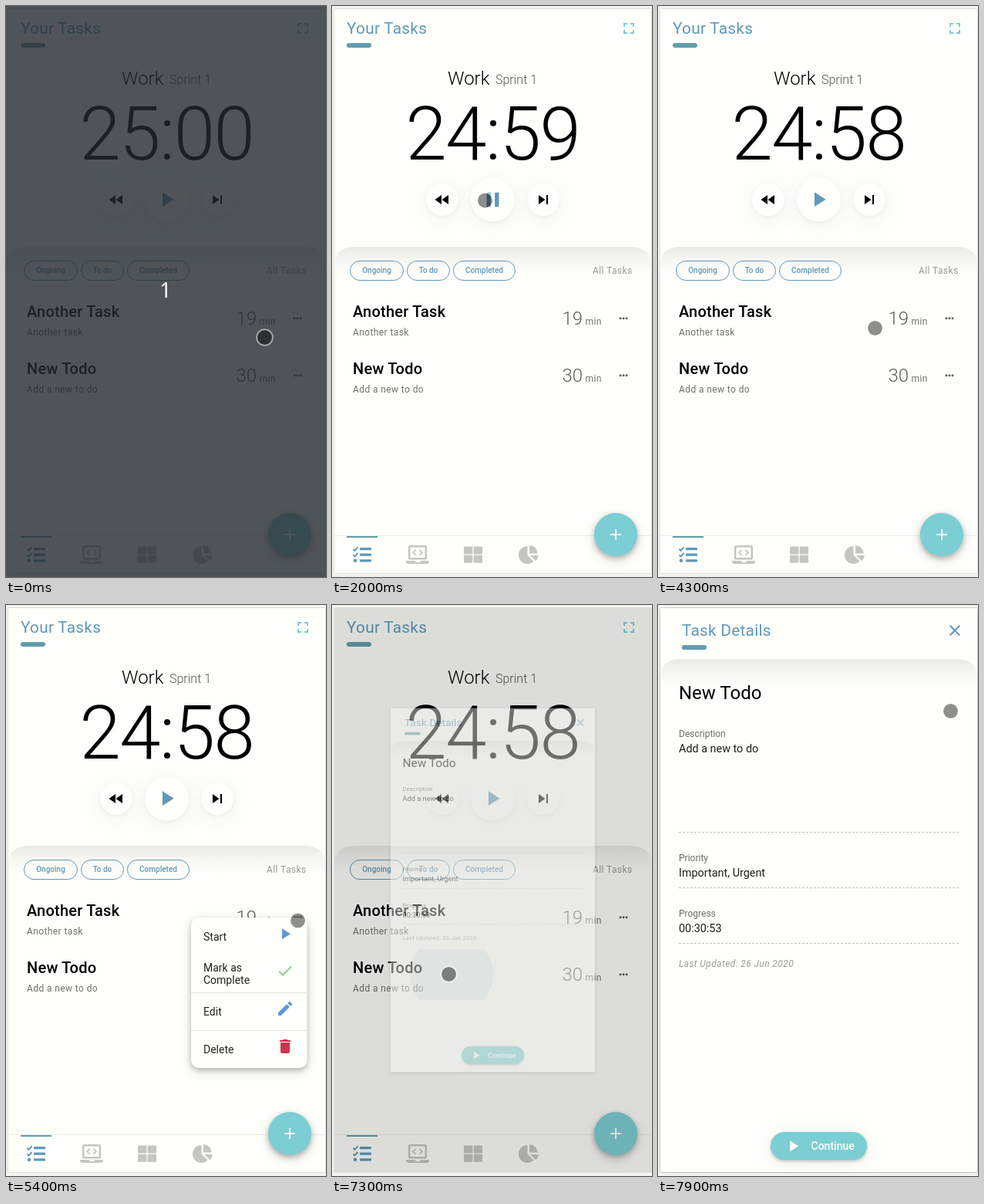
Animation of 415x740 px, one loop 8 s. Source, as an HTML page:

```html
<!DOCTYPE html>
<html lang="en">
<head>
<meta charset="utf-8">
<title>Task timer</title>
<style>
html, body { margin: 0; width: 100%; height: 100%; overflow: hidden; background: #f3f4ef; }
svg { display: block; width: 415px; height: 740px; font-family: Roboto, sans-serif; }
text { white-space: pre; }
.raised { fill: #fefffa; filter: drop-shadow(0 2px 3px rgba(0,0,0,.05)) drop-shadow(0 5px 14px rgba(0,0,0,.05)); }
.fab { fill: #7bced3; filter: drop-shadow(0 3px 3px rgba(0,0,0,.22)) drop-shadow(0 4px 7px rgba(0,0,0,.16)); }
.pill { fill: #7bced3; filter: drop-shadow(0 2px 2px rgba(0,0,0,.24)) drop-shadow(0 4px 14px rgba(0,0,0,.06)); }
.menu { fill: #fefffa; filter: drop-shadow(0 3px 3px rgba(0,0,0,.2)) drop-shadow(0 4px 7px rgba(0,0,0,.14)); }
.sheet { fill: #fefffa; filter: drop-shadow(0 2px 4px rgba(0,0,0,.25)); }
</style>
</head>
<body>
<svg id="stage" viewBox="0 0 415 740" xmlns="http://www.w3.org/2000/svg"></svg>
<script>
const BLUE = '#6098b8', TEAL = '#7bced3', BAR = '#629cab', PAPER = '#fefffa', IDLE = '#c5c6c2';
const LOOP = 8000, STEP = 100;

const ICONS = {
  fullscreen: 'M5 5H10V7H7V10H5ZM14 5H19V10H17V7H14ZM17 14H19V19H14V17H17ZM10 17V19H5V14H7V17Z',
  rewind: 'M11.5 12L20 18V6ZM11 18V6L2.5 12Z',
  next: 'M16 18H18V6H16ZM6 18L14.5 12L6 6Z',
  play: 'M8 5.14V19.14L19 12.14Z',
  pause: 'M14 19H18V5H14ZM6 19H10V5H6Z',
  check: 'M21 7L9 19L3.5 13.5L4.91 12.09L9 16.17L19.59 5.59Z',
  pencil: 'M20.7 7Q21.4 6.3 20.7 5.6L18.4 3.3Q17.7 2.6 17 3.3L15.1 5.1L18.9 8.9ZM3 17.2V21H6.8L17.8 9.9L14.1 6.2Z',
  trash: 'M19 4H15.5L14.5 3H9.5L8.5 4H5V6H19ZM6 19A2 2 0 0 0 8 21H16A2 2 0 0 0 18 19V7H6Z',
  close: 'M19 6.4L17.6 5L12 10.6L6.4 5L5 6.4L10.6 12L5 17.6L6.4 19L12 13.4L17.6 19L19 17.6L13.4 12Z'
};

const text = (x, y, str, size, fill = '#000', extra = '') =>
  `<text x="${x}" y="${y}" font-size="${size}" fill="${fill}" ${extra}>${str}</text>`;
const icon = (name, x, y, fill, scale = 1, extra = '') =>
  `<path d="${ICONS[name]}" fill="${fill}" transform="translate(${x} ${y}) scale(${scale})" ${extra}/>`;
const rect = (x, y, w, h, fill, r = 0, extra = '') =>
  `<rect x="${x}" y="${y}" width="${w}" height="${h}" rx="${r}" fill="${fill}" ${extra}/>`;
const circle = (x, y, r, extra = '') => `<circle cx="${x}" cy="${y}" r="${r}" ${extra}/>`;
const weight = (w, spacing = 0) => `font-weight="${w}" letter-spacing="${spacing}"`;
const panelTop = y =>
  `<g transform="translate(3 ${y})"><path d="M0 36V24Q0 0 28 0H383Q411 0 411 24V36Z" fill="url(#fade)"/></g>`;
const heading = (x, y, str) =>
  text(x, y, str, 20.8, BLUE, weight(400, .26)) + rect(x, y + 12, 32, 6, BAR, 3);

const chip = (x, w, label) =>
  rect(x + .5, 330.5, w - 1, 25, 'none', 12.5, `stroke="${BLUE}"`) +
  text(x + w / 2, 346, label, 10, BLUE, weight(500) + ' text-anchor="middle"');

const task = (y, title, note, minutes) =>
  text(27, y, title, 20, '#000', weight(500, .25)) +
  text(27, y + 24, note, 12, '#6f706d', weight(400, .4)) +
  text(298.5, y + 10, minutes, 24, '#5c5d5a', weight(300)) +
  text(328.5, y + 10, 'min', 12, '#6f706d', weight(400, .4)) +
  [374, 378, 382].map(x => circle(x, y + 1.7, 1.5, 'fill="#62635f"')).join('');

const navigation = () => rect(3, 686, 411, 1, '#ecede9') + rect(19, 687, 40, 2, BAR) +
  [702, 709.6, 717.2].map(y => rect(36, y, 15, 3.2, BLUE, .8)).join('') +
  [701, 708.6].map(y => `<path d="M27.5 ${y + 2.8}l2 2 4-4.4" fill="none" stroke="${BLUE}" stroke-width="2"/>`).join('') +
  circle(30, 718.8, 2.3, `fill="${BLUE}"`) +
  rect(100.2, 700.2, 21.6, 16, 'none', 1.5, `stroke="${IDLE}" stroke-width="2.6"`) +
  `<path d="M96 719H108Q108 721 110 721H113Q115 721 115 719H126Q126 723 123 723H99Q96 723 96 719Z" fill="${IDLE}"/>` +
  `<path d="M108.5 704.8l-3.4 3.4 3.4 3.4M113.5 704.8l3.4 3.4-3.4 3.4" fill="none" stroke="${IDLE}" stroke-width="1.8"/>` +
  [171, 183.7].map(x => [700.5, 711.7].map(y => rect(x, y, 11.4, 10, IDLE, 1)).join('')).join('') +
  `<path d="M253.5 711.5V700A11.5 11.5 0 1 0 261.6 719.6Z" fill="${IDLE}"/>` +
  `<path d="M256 709.5V699A10.8 10.8 0 0 1 266.8 709.5Z" fill="${IDLE}"/>` +
  `<path d="M257 712H267.8A11.5 11.5 0 0 1 264.3 719.3Z" fill="${IDLE}"/>`;

const home = () =>
  heading(19, 36, 'Your Tasks') + icon('fullscreen', 373, 17, TEAL) +
  text(150, 102, 'Work', 24, '#000', weight(300)) +
  text(212, 101, 'Sprint 1', 16, '#555', weight(300)) +
  text(208.3, 199, '25:00', 96, '#000', weight(300, -1.5) + ' id="clock" text-anchor="middle"') +
  circle(143, 251, 21, 'class="raised"') + circle(274, 251, 21, 'class="raised"') +
  circle(208.5, 251, 28.5, 'class="raised"') +
  circle(208.5, 251, 0, `id="tapPlay" fill="${BLUE}"`) +
  icon('rewind', 131, 239, '#000') + icon('next', 262, 239, '#000') +
  icon('play', 192.3, 234.5, BLUE, 4 / 3, 'id="play"') +
  icon('pause', 192.5, 235, BLUE, 4 / 3, 'id="pause"') +
  panelTop(312) +
  chip(23, 70, 'Ongoing') + chip(97, 56, 'To do') + chip(157, 81, 'Completed') +
  text(338, 347, 'All Tasks', 12, '#999a96', weight(400, .4)) +
  `<g clip-path="url(#row)">${circle(155, 479, 0, 'id="tapRow" fill="#5f88b0"')}</g>` +
  task(403, 'Another Task', 'Another task', 19) +
  task(477, 'New Todo', 'Add a new to do', 30) +
  navigation() +
  circle(368, 685, 28, 'class="fab"') +
  rect(361, 684, 14, 2, '#fff') + rect(367, 678, 2, 14, '#fff');

const menuItem = (y, lines, name, color, iconY) =>
  lines.map((s, i) => text(256, y + 16 * i, s, 14, '#222')).join('') + icon(name, 350, iconY, color);

const menu = () => rect(240, 405, 150.5, 195, PAPER, 10, 'class="menu"') +
  rect(240, 502, 150, 1, '#e2e3df') + rect(240, 551, 150, 1, '#e2e3df') +
  menuItem(435, ['Start'], 'play', '#6098d4', 414) +
  menuItem(475, ['Mark as', 'Complete'], 'check', '#8bd48e', 462) +
  menuItem(532, ['Edit'], 'pencil', '#6098d8', 511) +
  menuItem(581, ['Delete'], 'trash', '#cf3350', 560);

const field = (y, label, value, lineY) =>
  text(27, y, label, 12, '#6b6c69') +
  text(27, y + 20, value, 14.4, '#1d1d1c') +
  `<path d="M27 ${lineY}.5H390" stroke="#bfc0bc" stroke-dasharray="3 2"/>`;

const details = () => rect(3, 4, 411, 731, PAPER, 0, 'class="sheet"') +
  heading(31, 40, 'Task Details') + icon('close', 373, 21, BLUE) + panelTop(70) +
  text(27, 122, 'New Todo', 24) +
  field(171, 'Description', 'Add a new to do', 294) +
  field(332, 'Priority', 'Important, Urgent', 366) +
  field(404, 'Progress', '00:30:53', 438) +
  text(27, 469, 'Last Updated: 26 Jun 2020', 12, '#9a9b97', weight(400, .4) + ' font-style="italic"') +
  rect(146, 683, 125, 36, TEAL, 18, 'class="pill"') + icon('play', 163, 689, '#fff') +
  text(198.5, 706, 'Continue', 14, '#fff', weight(500));

const stage = document.getElementById('stage');
stage.innerHTML = `<defs>
  <linearGradient id="fade" x1="0" y1="0" x2="0" y2="1">
    <stop offset="0" stop-opacity=".085"/><stop offset=".45" stop-opacity=".035"/><stop offset="1" stop-opacity="0"/>
  </linearGradient>
  <clipPath id="row"><rect x="3" y="446" width="411" height="66"/></clipPath>
  <clipPath id="card"><rect x="2" y="3" width="413" height="733"/></clipPath></defs>` +
  rect(0, 0, 415, 740, '#f3f4ef') +
  rect(2.5, 3.5, 412, 732, PAPER, 1, 'stroke="#dfe0db"') +
  home() + `<g id="menu">${menu()}</g>` +
  rect(3, 4, 411, 731, '#000', 0, 'id="shade"') +
  `<g clip-path="url(#card)"><g id="details">${details()}</g></g>` +
  `<g id="countdown">${rect(0, 0, 415, 740, '#252a30', 0, 'opacity=".8"')}` +
  text(207, 378, '1', 27, '#fff', 'font-family="Noto Sans, Open Sans, sans-serif" font-weight="500" text-anchor="middle"') + '</g>' +
  `<g id="cursor">${circle(0, 0, 9.5, 'fill-opacity=".44"')}` +
  circle(0, 0, 10.4, 'fill="none" stroke="#fff" stroke-opacity=".5" stroke-width="1.8"') + '</g>';

const el = Object.fromEntries([...stage.querySelectorAll('g[id], text[id], path[id], circle[id], rect[id]')].map(n => [n.id, n]));

// Each entry: time, then the values reached at that time.
const CURSOR = [
  [500, 335.5, 429.5], [600, 312, 400], [700, 252, 322], [800, 210, 266], [900, 198.5, 252],
  [3700, 198.5, 252], [3900, 258, 259], [4000, 258, 259], [4100, 264, 322], [4200, 271, 385],
  [4300, 281.5, 417.5], [4400, 304, 425], [4500, 333, 420], [4700, 372, 408], [4800, 372, 408],
  [4900, 378.5, 409], [5800, 378.5, 409], [5900, 330, 440], [6000, 240, 485], [6100, 183.5, 503.5],
  [6200, 183.5, 503.5], [6300, 169.5, 532], [6900, 169.5, 532], [7100, 151.5, 478.5],
  [7700, 151.5, 478.5], [7800, 300, 250], [7900, 379.5, 137.5]
];
const DIALOG = [[7200, 0], [7300, .29], [7400, .82], [7500, .96], [7600, 1]];

const clamp = v => Math.min(1, Math.max(0, v));
const easeOut = v => 1 - (1 - clamp(v)) ** 3;

function follow(keys, t) {
  const i = keys.findIndex(k => k[0] > t);
  if (i === 0) return keys[0].slice(1);
  if (i < 0) return keys[keys.length - 1].slice(1);
  const [a, b] = [keys[i - 1], keys[i]], p = (t - a[0]) / (b[0] - a[0]);
  return a.slice(1).map((v, n) => v + (b[n + 1] - v) * p);
}

function ripple(node, t, start, radius, strength) {
  const age = t - start;
  node.setAttribute('r', age < 0 ? 0 : radius * easeOut((age + 60) / 360));
  node.setAttribute('opacity', strength * clamp((600 - age) / 300));
}

const show = (node, on) => node.setAttribute('visibility', on ? 'visible' : 'hidden');

function draw(time) {
  const t = Math.floor((time % LOOP) / STEP) * STEP;
  const running = t >= 1400 && t < 3400;
  show(el.countdown, t < 200);
  show(el.pause, running);
  show(el.play, !running);
  el.clock.textContent = t < 1400 ? '25:00' : t < 2400 ? '24:59' : '24:58';

  ripple(el.tapPlay, t, t < 3000 ? 1300 : 3300, 28.5, .16);
  ripple(el.tapRow, t, 7100, 55, .14);

  const opened = easeOut((t - 5050) / 400), closed = clamp((t - 6450) / 430);
  el.menu.setAttribute('opacity', opened * (1 - closed) ** 1.35);
  show(el.menu, t >= 5100 && closed < 1);

  const [p] = follow(DIALOG, t), scale = .5 + p / 2;
  el.shade.setAttribute('opacity', p * .46);
  el.details.setAttribute('opacity', clamp(p * 1.5));
  el.details.setAttribute('transform', `translate(208.5 369.5) scale(${scale}) translate(-208.5 -369.5)`);
  show(el.details, p > 0);

  el.cursor.setAttribute('transform', `translate(${follow(CURSOR, t).join(' ')})`);
}

let began;
function tick(now) {
  began ??= now;
  draw(now - began);
  requestAnimationFrame(tick);
}
draw(0);
requestAnimationFrame(tick);
</script>
</body>
</html>
```
